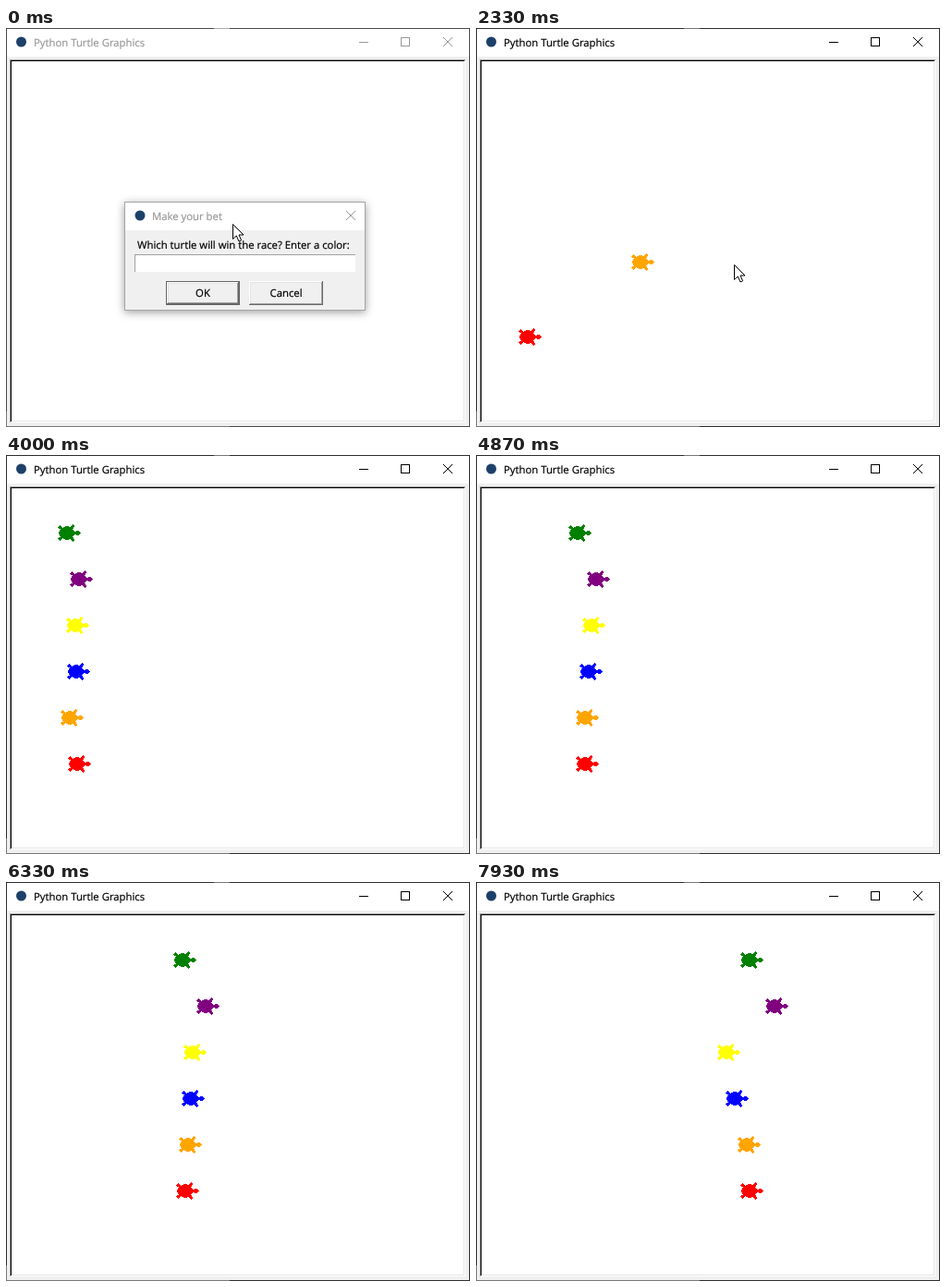
An HTML page that plays this animation: 502 by 432 pixels, repeating every 8000 ms.

```html
<!DOCTYPE html>
<html lang="en">
<head>
<meta charset="utf-8">
<title>Turtle race</title>
<style>
html, body { margin: 0; width: 100%; height: 100%; overflow: hidden; background: #f0f0f0; }
svg { display: block; }
text {
  font: 11.34px "Open Sans", "Noto Sans", sans-serif;
  text-rendering: geometricPrecision; white-space: pre;
  fill: currentColor; stroke: currentColor; stroke-width: .2px;
}
.crisp { shape-rendering: crispEdges; }
.line { fill: none; stroke: currentColor; }
.win { color: #999; }
.win.active, .body { color: #000; }
#dialog .frame { fill: #f0f0f0; stroke: #a5a5a5; filter: drop-shadow(0 2px 5px rgba(0, 0, 0, .38)); }
#dialog.active .frame { stroke: #6e6e6e; filter: drop-shadow(0 4px 7px rgba(0, 0, 0, .46)); }
.edge { fill: none; stroke: #484848; }
.active .edge { stroke: #2e2e2e; }
.gap { stroke: #aaa; }
.active .gap { stroke: #777; }
</style>
</head>
<body>
<svg width="502" height="432" viewBox="0 0 502 432">
  <defs>
    <path id="shell" class="crisp" stroke-width="1" stroke-linejoin="round"
      d="M16 0L14 -2L10 -1L7 -4L9 -7L8 -9L5 -6L1 -7L-3 -5L-6 -8L-8 -6L-5 -4L-7 0L-5 4L-8 6L-6 8L-3 5L1 7L5 6L8 9L9 7L7 4L10 1L14 2Z"/>
    <path id="cross" class="line" d="M0 0L10 10M10 0L0 10"/>
  </defs>

  <g id="main" class="win">
    <rect width="502" height="432" fill="#f0f0f0"/>
    <rect width="502" height="31" fill="#fff"/>
    <g class="crisp">
      <rect x="4" y="34" width="493" height="393" fill="#fff"/>
      <path d="M4.5 427V34.5H497" fill="none" stroke="#999"/>
      <path d="M5.5 426V35.5H496" fill="none" stroke="#000"/>
      <path d="M495.5 36V425.5H6" fill="none" stroke="#e6e6e6"/>
      <rect class="edge" x=".5" y=".5" width="501" height="431"/>
      <path class="gap" d="M225 .5H242"/>
      <path d="M0 431.5H242M.5 415V432" stroke="#777"/>
    </g>
    <circle cx="16.5" cy="15" r="5.5" fill="#1d4069"/>
    <text x="30" y="20">Python Turtle Graphics</text>
    <path class="line crisp" d="M382 15.5H392M427.5 10.5H436.5V19.5H427.5Z"/>
    <use href="#cross" x="473" y="10"/>
  </g>

  <g id="field"></g>

  <g id="dialog" class="win">
    <rect class="frame crisp" x="128.5" y="188.5" width="260" height="117"/>
    <rect x="129" y="189" width="259" height="30" fill="#fff"/>
    <circle cx="145" cy="203" r="5.5" fill="#1d4069"/>
    <text x="158" y="208">Make your bet</text>
    <use href="#cross" x="368" y="198"/>
    <g class="crisp" fill="none">
      <rect x="139" y="245" width="239" height="19" fill="#fff"/>
      <path d="M139.5 264V245.5H378" stroke="#a0a0a0"/>
      <rect x="173.5" y="274.5" width="79" height="25" stroke="#646464"/>
      <path d="M174.5 298V275.5H251M263.5 299V274.5H342" stroke="#fff"/>
      <path d="M175.5 297V276.5H250M264.5 298V275.5H341" stroke="#e3e3e3"/>
      <path d="M251.5 275V298.5H174M342.5 274V299.5H263" stroke="#696969"/>
      <path d="M250.5 276V297.5H175M341.5 275V298.5H264" stroke="#a0a0a0"/>
    </g>
    <g class="body">
      <text x="142" y="239">Which turtle will win the race? Enter a color:</text>
      <text x="213" y="291" text-anchor="middle">OK</text>
      <text x="303" y="291" text-anchor="middle">Cancel</text>
      <text id="typed" x="141" y="259"></text>
    </g>
    <rect id="caret" class="crisp" y="247" width="2" height="15"/>
  </g>

  <path id="arrow" fill="#fff" stroke="#000" d="M.5 .5V16.5L4.3 13L7 19L9.6 17.8L7 12H12Z"/>
  <g id="beam" class="crisp">
    <path d="M-3 -7.5H0M1 -7.5H4M.5 -7V7M-3 7.5H0M1 7.5H4" fill="none" stroke="#000"/>
  </g>
</svg>
<script>
const LOOP = 8000, FPS = 15;
const HOP = 16, LINEUP = 1912;
const HOME = { x: 254, y: 234 }, START_X = 54;
const MARKS = [3704, 4000, 4467, 5333, 5733, 6200, 6933, 7067, 7933];
const RUNNERS = [
  { color: "red",    hops: 19, run: [0, 21, 43, 84, 103, 130, 175, 183, 240] },
  { color: "orange", hops: 18, run: [0, 13, 40, 88, 111, 134, 170, 174, 237] },
  { color: "blue",   hops: 17, run: [0, 20, 45, 91, 112, 137, 177, 184, 224] },
  { color: "yellow", hops: 18, run: [0, 19, 46, 96, 119, 140, 174, 180, 215] },
  { color: "purple", hops: 19, run: [0, 23, 51, 100, 126, 152, 198, 214, 267] },
  { color: "green",  hops: 21, run: [0, 10, 37, 73, 97, 125, 179, 188, 240] }
];

const $ = id => document.getElementById(id);
const clamp = v => Math.max(0, Math.min(1, v));
const mix = (a, b, f) => a + (b - a) * f;
const ease = f => f * f * (3 - 2 * f);
const show = (el, on) => el.setAttribute("visibility", on ? "visible" : "hidden");
const move = (el, x, y) => el.setAttribute("transform", `translate(${Math.round(x)} ${Math.round(y)})`);

let begin = LINEUP;
RUNNERS.forEach((r, i) => {
  r.begin = begin;
  begin += r.hops * HOP;
  r.y = 334 - 50 * i;
  r.el = document.createElementNS("http://www.w3.org/2000/svg", "use");
  r.el.setAttribute("href", "#shell");
  r.el.setAttribute("fill", r.color);
  r.el.setAttribute("stroke", r.color);
  $("field").append(r.el);
});

function distance(run, t) {
  if (t <= MARKS[0]) return 0;
  let i = 1;
  while (i < MARKS.length - 1 && t > MARKS[i]) i++;
  return mix(run[i - 1], run[i], clamp((t - MARKS[i - 1]) / (MARKS[i] - MARKS[i - 1])));
}

function drawRunner(r, t) {
  const f = clamp(Math.floor((t - r.begin) / HOP) / r.hops);
  const x = mix(HOME.x, START_X, f) + distance(r.run, t);
  show(r.el, t >= r.begin);
  // half-pixel offset keeps the one-pixel outline on whole pixels
  r.el.setAttribute("transform", `translate(${Math.round(x) + .5} ${Math.round(mix(HOME.y, r.y, f)) + .5})`);
}

function drawDialog(t) {
  const open = t < 1930, focus = t >= 395;
  $("dialog").style.display = open ? "" : "none";
  $("dialog").classList.toggle("active", focus);
  $("main").classList.toggle("active", !open);
  const n = (t >= 1195) + (t >= 1330) + (t >= 1665);
  $("typed").textContent = "red".slice(0, n);
  $("caret").setAttribute("x", [140, 145, 150, 157][n]);
  show($("caret"), open && focus && (t < 995 || n > 0));
}

function drawPointer(t) {
  const reach = ease(clamp(t / 530)), leave = clamp((t - 2400) / 550);
  const x = mix(245, 279, reach) + 230 * leave * leave;
  const y = mix(212, 256, reach) - 2 * leave;
  const text = t < 1930 && y > 246;
  show($("beam"), text);
  show($("arrow"), !text && t < 3000);
  move($("beam"), x, y);
  move($("arrow"), x, y);
}

function draw(ms) {
  const t = Math.floor((ms + 4) * FPS / 1000) * 1000 / FPS;
  drawDialog(t);
  RUNNERS.forEach(r => drawRunner(r, t));
  drawPointer(t);
}

const origin = performance.now();
function tick() {
  draw((performance.now() - origin) % LOOP);
  requestAnimationFrame(tick);
}
draw(0);
requestAnimationFrame(tick);
</script>
</body>
</html>
```
